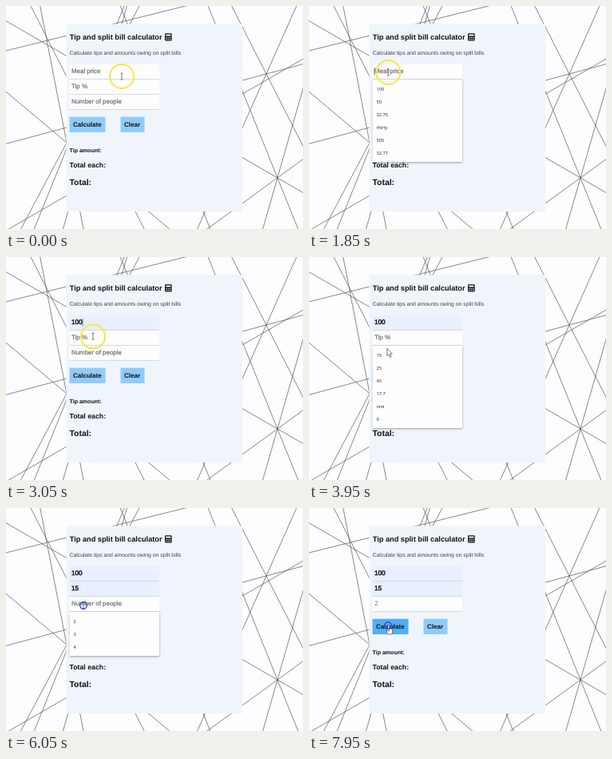
An HTML page with a canvas that plays this animation: 372x279 px, repeating every 8000 ms.

```html
<!DOCTYPE html>
<html lang="en">
<head>
<meta charset="utf-8">
<title>Tip and split bill calculator</title>
<style>
html, body { margin: 0; width: 100%; height: 100%; overflow: hidden; background: #fdfcfe; }
canvas { display: block; width: 372px; height: 279px; }
</style>
</head>
<body>
<canvas id="stage"></canvas>
<script>
const W = 372, H = 279, LOOP = 8000;
const LEFT = 79.5, FIELD_W = 112.5, ROW = 19, ITEM = 16;
const SANS = '"Liberation Sans", Arial, sans-serif';
const MENU = '"Open Sans", "Noto Sans", sans-serif';
const CARD = '#eff5fb', BUTTON = '#90cbfb', INK = '#111';

const canvas = document.getElementById('stage');
const ctx = canvas.getContext('2d');
const dpr = window.devicePixelRatio || 1;
canvas.width = W * dpr;
canvas.height = H * dpr;
ctx.textRendering = 'geometricPrecision';

// Background web: bundles of long lines crossing at a hub
const hubs = [
  { x: 76, y: 171, angle: 40, step: 39, count: 3 },
  { x: 31, y: 0, angle: 63, step: 0, count: 1 },
  { x: 0, y: 56, angle: -14, step: 0, count: 1 },
  { x: 45, y: 255, angle: 112, step: 38, count: 2 },
  { x: 148, y: 12, angle: 68, step: 38, count: 2 },
  { x: 326, y: 85, angle: 63, step: 51, count: 3 },
  { x: 340, y: 215, angle: 30, step: 38, count: 4 }
];

// Each field opens its menu, previews the first item, then takes it
const fields = [
  { label: 'Meal price', items: ['100', '50', '32.70', 'thirty', '505', '32.77'], open: 450, hover: 2100, pick: 2725 },
  { label: 'Tip %', items: ['15', '25', '45', '17.7', 'one', '0'], open: 3350, hover: 4000, pick: 4825 },
  { label: 'Number of people', items: ['2', '3', '4'], open: 5525, hover: Infinity, pick: 6250 }
];

const home = { x: 145, y: 88 };
const moves = [
  { from: 300, to: 1000, x: 128, y: 80 },
  { from: 1150, to: 1450, x: 97, y: 80 },
  { from: 1700, to: 2300, x: 111, y: 99 },
  { from: 2950, to: 3300, x: 101, y: 101 },
  { from: 3700, to: 4050, x: 97, y: 119 },
  { from: 5450, to: 5550, x: 97, y: 122 },
  { from: 6950, to: 7300, x: 99, y: 147 }
];

const within = (t, a, b) => t >= a && t < b;
const clamp = k => Math.min(1, Math.max(0, k));
const ease = k => k * k * (3 - 2 * k);

function rect(x, y, w, h, color) {
  ctx.fillStyle = color;
  ctx.fillRect(x, y, w, h);
}

function text(str, x, y, size, { color = INK, weight = 'normal', family = SANS, outline = 0 } = {}) {
  ctx.font = `${weight} ${size}px ${family}`;
  ctx.fillStyle = ctx.strokeStyle = color;
  ctx.fillText(str, x, y);
  if (outline) {
    ctx.lineWidth = outline;
    ctx.strokeText(str, x, y);
  }
}

function line(x1, y1, x2, y2, color, width) {
  ctx.strokeStyle = color;
  ctx.lineWidth = width;
  ctx.beginPath();
  ctx.moveTo(x1, y1);
  ctx.lineTo(x2, y2);
  ctx.stroke();
}

function circle(x, y, r, color, width) {
  ctx.strokeStyle = color;
  ctx.lineWidth = width;
  ctx.beginPath();
  ctx.arc(x, y, r, 0, Math.PI * 2);
  ctx.stroke();
}

function drawWeb() {
  for (const { x, y, angle, step, count } of hubs)
    for (let i = 0; i < count; i++) {
      const a = (angle + i * step) * Math.PI / 180;
      const dx = Math.cos(a) * W * 2, dy = Math.sin(a) * W * 2;
      line(x - dx, y - dy, x + dx, y + dy, '#555', 0.7);
    }
}

function drawIcon() {
  ctx.fillStyle = INK;
  ctx.beginPath();
  ctx.roundRect(199, 34.3, 8.6, 9.3, 1);
  ctx.fill();
  rect(200.2, 35.5, 6.2, 2, CARD);
  for (let i = 0; i < 6; i++)
    rect(200.3 + i % 3 * 2.3, 38.9 + Math.floor(i / 3) * 2.2, 1.3, 1.3, CARD);
}

function drawButton(label, x, w, color) {
  rect(x, 138.7, w, 19.3, color);
  text(label, x + 4.4, 151.3, 8.05, { weight: 'bold' });
}

function drawPage(t) {
  const bold = { weight: 'bold' };
  rect(0, 0, W, H, '#fdfcfe');
  drawWeb();
  rect(75.5, 22.5, 220.5, 234.5, CARD);
  text('Tip and split bill calculator', 79.8, 42, 9.2, bold);
  drawIcon();
  text('Calculate tips and amounts owing on split bills', LEFT, 61.3, 6.85, { color: '#444' });
  text('Tip amount:', LEFT, 183, 7.05, bold);
  text('Total each:', LEFT, 202.3, 8.75, bold);
  text('Total:', LEFT, 223.6, 10.4, bold);
  drawButton('Calculate', LEFT, 45, t >= 7900 ? '#50b0f6' : BUTTON);
  drawButton('Clear', 143.5, 30, BUTTON);
}

function drawField({ label, items, hover, pick }, row, t) {
  const y = 73 + row * ROW, base = y + 11.2;
  const filled = t >= hover;
  rect(LEFT, y, FIELD_W, 18.5, filled ? '#e8f0fd' : '#fdfdfe');
  line(LEFT, y + 18.5, LEFT + FIELD_W, y + 18.5, '#cfd3d8', 0.8);
  if (t >= pick) text(items[0], 82, base, 8.2, { color: filled ? INK : '#777', outline: filled ? 0.45 : 0 });
  else if (filled) text(items[0], 82, base, 5.6, { family: MENU });
  else text(label, 82, base, 7.92, { color: '#707070', outline: 0.22 });
}

// The caret restarts its blink whenever the focused field changes
function drawCaret(t) {
  const row = fields.findLastIndex(f => t >= f.open);
  if (row < 0) return;
  const { items, open, hover, pick } = fields[row];
  const since = Math.max(...[open, hover, pick].filter(e => e <= t));
  if ((t - since + 50) % 1000 >= 500) return;
  ctx.font = `8.2px ${SANS}`;
  const x = 82 + (t >= pick ? ctx.measureText(items[0]).width + 0.3 : 0);
  line(x, 77 + row * ROW, x, 86.5 + row * ROW, '#333', 0.7);
}

function drawMenu({ items, hover }, row) {
  const y = 92 + row * ROW;
  ctx.save();
  ctx.shadowColor = 'rgba(0,0,0,.35)';
  ctx.shadowBlur = 2.5 * dpr;
  ctx.shadowOffsetY = 0.5 * dpr;
  rect(LEFT, y, FIELD_W, items.length * ITEM + 7, '#fefdff');
  ctx.restore();
  if (hover) rect(LEFT, y + 4, FIELD_W, 15.5, '#c6c6c6');
  items.forEach((s, i) => text(s, 84.5, y + 14 + i * ITEM, 5.6, { color: '#222', family: MENU }));
}

function outlineShape() {
  ctx.fillStyle = '#fff';
  ctx.fill();
  ctx.strokeStyle = '#444';
  ctx.lineWidth = 0.7;
  ctx.stroke();
}

function drawArrow(x, y) {
  ctx.beginPath();
  for (const [a, b] of [[0, 0], [0, 9.3], [2.1, 7.4], [3.7, 11], [5.2, 10.3], [3.6, 6.9], [6.6, 6.7]])
    ctx.lineTo(x + a, y + b);
  ctx.closePath();
  outlineShape();
}

function drawHand(x, y) {
  ctx.beginPath();
  ctx.roundRect(x - 1.5, y + 4, 7, 7, 2);
  outlineShape();
  ctx.beginPath();
  ctx.roundRect(x - 0.3, y, 2, 7, 1);
  outlineShape();
}

function drawBeam(x, y) {
  line(x, y - 4, x, y + 4, '#555', 0.8);
  for (const end of [-4, 4]) line(x - 1.5, y + end, x + 1.5, y + end, '#555', 0.7);
}

function drawPointer(t) {
  let { x, y } = home;
  for (const m of moves) {
    const k = ease(clamp((t - m.from) / (m.to - m.from)));
    x += (m.x - x) * k;
    y += (m.y - y) * k;
  }
  if (t < 3750) circle(x, y, 15, '#f5e940', 2);
  const overMenu = fields.some((f, row) => within(t, f.open, f.pick) && y > 92 + row * ROW);
  if (y > 139) drawHand(x, y);
  else if (overMenu) drawArrow(x, y - 1);
  else drawBeam(x, y);
  const presses = [[2700, 2950], [3300, 3500], [4800, 6950], [7900, LOOP]];
  if (presses.some(([a, b]) => within(t, a, b))) circle(x, y, 4.2, '#3443e0', 1.4);
}

function draw(t) {
  ctx.setTransform(dpr, 0, 0, dpr, 0, 0);
  drawPage(t);
  fields.forEach((f, row) => drawField(f, row, t));
  drawCaret(t);
  fields.forEach((f, row) => {
    if (within(t, f.open, f.pick)) drawMenu({ items: f.items, hover: t >= f.hover }, row);
  });
  drawPointer(t);
}

const start = performance.now();
function tick() {
  draw((performance.now() - start) % LOOP);
  requestAnimationFrame(tick);
}
tick();
</script>
</body>
</html>
```
